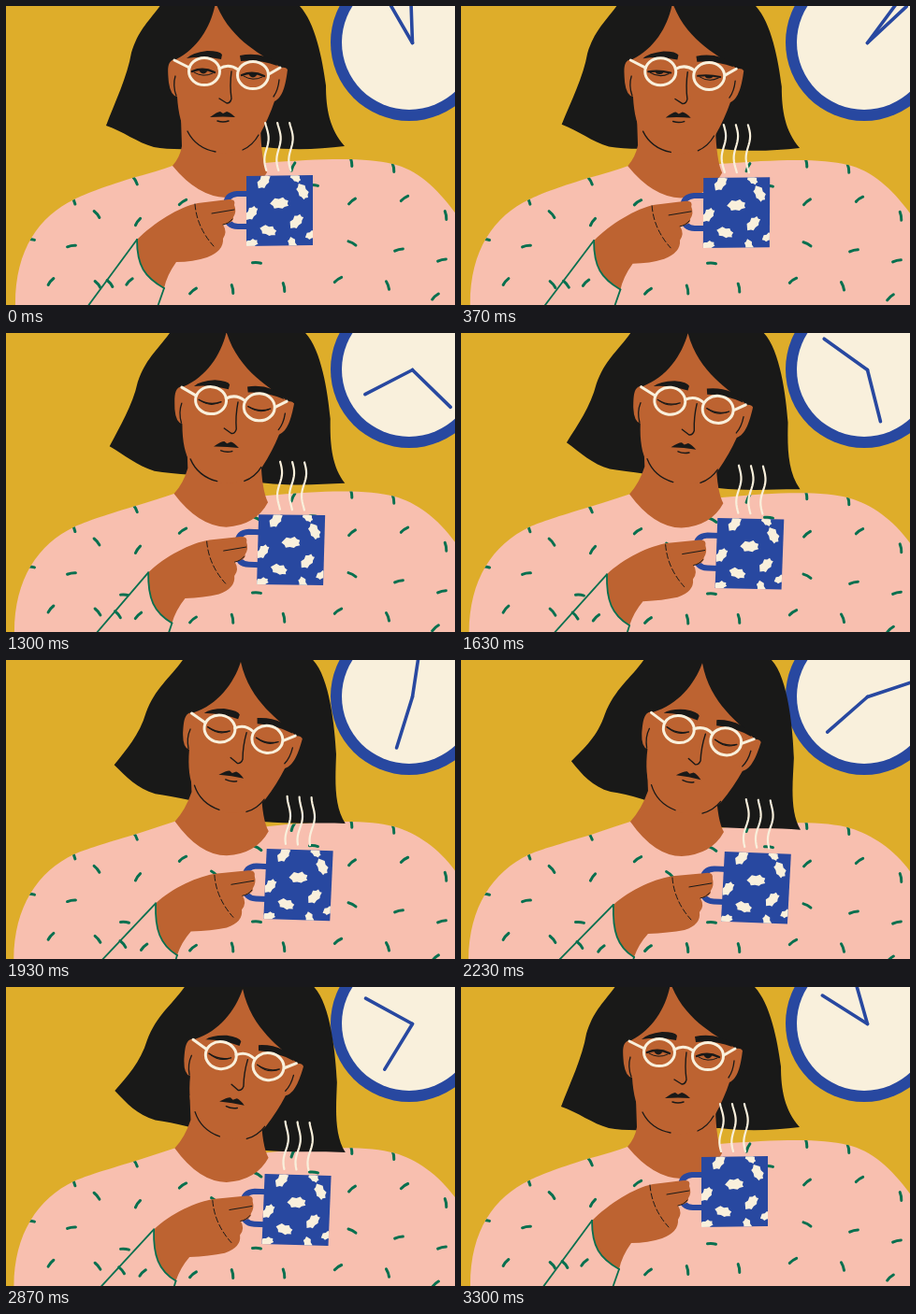
An HTML page with a canvas that plays this animation: 480 by 320 pixels, repeating every 3330 ms.

```html
<!DOCTYPE html>
<html>
<head>
<meta charset="utf-8">
<style>
html, body { margin: 0; width: 100%; height: 100%; overflow: hidden; background: #dead2a; }
canvas { display: block; }
</style>
</head>
<body>
<canvas id="stage" width="480" height="320"></canvas>
<script>
const ctx = document.getElementById('stage').getContext('2d');
const LOOP = 3330, STEP = LOOP / 100;
const GOLD = '#dead2a', BLACK = '#191918', SKIN = '#bd6331', PINK = '#f8bfaf',
      GREEN = '#07704f', BLUE = '#2848a0', CREAM = '#f9f0dc';
const rad = deg => deg * Math.PI / 180;

// Pose curves: [time, value] keys joined by a smooth spline
const LEAN = [[0, 0], [370, .06], [970, .16], [1630, .56], [2230, 1], [2870, .84], [3200, 0], [LOOP, 0]];
const LOWER = [[0, 0], [370, .09], [970, .35], [1630, .71], [2230, 1], [2870, .78], [3200, 0], [LOOP, 0]];
const EYES = [[0, 1], [370, .7], [800, 0], [2870, 0], [3200, 1], [LOOP, 1]];

function spline(keys, t) {
  let i = 0;
  while (i < keys.length - 2 && t >= keys[i + 1][0]) i++;
  const slope = j => {
    const a = keys[j - 1], b = keys[j], c = keys[j + 1];
    if (!a || !c || (b[1] - a[1]) * (c[1] - b[1]) <= 0 && c[1] === b[1]) return 0;
    return (c[1] - a[1]) / (c[0] - a[0]);
  };
  const [t0, v0] = keys[i], [t1, v1] = keys[i + 1], d = t1 - t0, u = (t - t0) / d;
  const s = u * u * (3 - 2 * u);
  return v0 + (v1 - v0) * s + d * u * (1 - u) * ((1 - u) * slope(i) - u * slope(i + 1));
}

// Blend two path strings that share the same commands
function mix(a, b, k) {
  const to = b.match(/-?[\d.]+/g);
  let i = 0;
  return a.replace(/-?[\d.]+/g, n => +n + (to[i++] - n) * k);
}
function fill(d, color) {
  ctx.fillStyle = color;
  ctx.fill(new Path2D(d));
}
function line(d, color, width) {
  ctx.strokeStyle = color;
  ctx.lineWidth = width;
  ctx.stroke(new Path2D(d));
}
function disc(x, y, r, color) {
  ctx.fillStyle = color;
  ctx.beginPath();
  ctx.arc(x, y, r, 0, 7);
  ctx.fill();
}
function group(draw, x = 0, y = 0, deg = 0, px = 0, py = 0) {
  ctx.save();
  ctx.translate(px + x, py + y);
  ctx.rotate(rad(deg));
  ctx.translate(-px, -py);
  draw();
  ctx.restore();
}
function sprinkle(x, y, deg) {
  group(() => line('M-4.5 0Q0 -1 4.5 0', GREEN, 3), x, y, deg);
}

function clock(t) {
  disc(431, 39, 84, BLUE);
  disc(431, 39, 72, CREAM);
  for (const deg of [330 + .21 * t, -2 + .105 * t])
    group(() => line('M0 0V-57', BLUE, 3.6), 434.5, 39.5, deg);
}

const SPRINKLES = [
  [138, 187, 60], [72, 208, 65], [97, 223, 50], [141, 231, -55], [26, 250, 5], [70, 257, -10],
  [48, 295, -50], [98, 298, 50], [127, 280, 5], [189, 210, -35], [223, 225, 40], [242, 303, 80],
  [200, 305, -40], [268, 275, 3], [297, 301, 80], [355, 293, -35], [370, 209, -40], [426, 206, -35],
  [370, 254, 28], [420, 261, -14], [466, 272, -14], [408, 299, 70], [459, 311, -42], [369, 167, 80],
  [414, 173, 80], [470, 224, 80], [307, 172, -65], [269, 196, 30], [329, 192, 5]
];

function body(low) {
  const shape = mix(
    'M178 171Q162 177 135 184C100 195 85 201 73 207C35 225 9 262 10 322H482V224C462 196 440 175 413 169C385 162 340 163 276 168Z',
    'M181 173Q165 178 139 187C102 198 88 202 73 208C33 227 8 266 8 322H482V229C465 204 440 187 416 180C388 172 340 173 276 180Z', low);
  group(() => {
    fill(shape, PINK);
    ctx.clip(new Path2D(shape));
    for (const [x, y, deg] of SPRINKLES)
      sprinkle(x, y + low * 9 * Math.min(1, Math.max(.1, (x - 100) / 250)), deg);
  });
}

function hair(lean) {
  fill(mix(
    'M166 -2C150 20 142 25 134 50C130 75 116 104 107 128C125 134 140 146 158 151Q175 154 200 153L276 151C310 155 335 153 362 150C346 132 342 110 342 85C338 55 330 15 312 -2Z',
    'M197 -2C182 20 165 30 154 58C146 82 132 94 118 108C130 123 140 135 160 141Q175 143 194 149L274 179C310 182 335 179 363 182C351 162 355 130 356 105C355 75 350 15 330 -2Z', lean), BLACK);
}

function neck(low) {
  fill(mix(
    'M187 120L188 150Q186 162 178 171Q205 204 235 205Q266 203 279 178Q273 165 272 130Z',
    'M199 115L200 140Q193 160 181 173Q207 210 236 210Q268 208 281 184Q274 172 273 140Z', low), SKIN);
}

function eye(x, y, open) {
  const lid = 6 - 11 * open;
  ctx.fillStyle = BLACK;
  if (open > .05) {
    ctx.beginPath();
    ctx.ellipse(x, y + lid / 2, 4.5, 5 * open, 0, 0, Math.PI);
    ctx.fill();
  }
  line(`M${x - 12} ${y}Q${x} ${y + lid} ${x + 12} ${y + 1}`, BLACK, 1.4 + open);
  line(`M${x - 10} ${y + 1}Q${x} ${y + 7} ${x + 10} ${y + 2}`, BLACK, 1);
}

function lens(x, y) {
  ctx.beginPath();
  ctx.ellipse(x, y, 16.5, 14.5, 0, 0, 7);
  ctx.strokeStyle = CREAM;
  ctx.lineWidth = 3;
  ctx.stroke();
}

function head(open) {
  fill('M224 -4C220 20 206 45 182 57C171 57 173 70 174 82Q176 96 183 97C184 115 188 130 194 137Q208 157 230 158Q258 157 271 138Q281 120 287 102C296 98 299 84 301 68Q299 65 294 66C275 52 240 38 224 -4Z', SKIN);
  line('M181 75Q178 85 182 96M292 79Q291 90 286 97M194 134Q203 152 224 156M253 154Q264 149 270 138', BLACK, 1.3);
  line('M241 70Q239 85 241 99Q240 104 236 104L228 99', BLACK, 1.4);
  fill('M193 56Q199 50 215 48Q229 48 231 52L230 57Q211 53 193 56ZM250 53Q264 50 277 54Q288 58 290 64Q270 57 251 59Z', BLACK);
  fill('M218 119Q226 113 229 113L232 115L236 113Q240 114 245 119Q232 118 218 119Z', BLACK);
  line('M226 123Q232 125 238 123', BLACK, 1.5);
  eye(211, 70, open);
  eye(264, 74, open);
  lens(212, 70);
  lens(264, 74);
  line('M180 58L196 66M281 73L293 66M228 67Q238 61 248 68', CREAM, 3);
}

// x, y, angle, size
const PATCHES = [
  [275, 188, -55, 1], [309, 183, 40, .75], [317, 198, 62, 1], [292, 211, -3, 1.1], [262, 222, -55, .95],
  [280, 240, 15, 1], [310, 231, -50, 1], [326, 245, -25, .75], [262, 254, -15, .8], [306, 254, 75, .8]
];

function mug(t) {
  line('M260 201H247Q235 202 235 214V223Q236 236 248 236H260', BLUE, 6);
  const cup = 'M257 182L328 181L328 256L257 257Z';
  group(() => {
    fill(cup, BLUE);
    ctx.clip(new Path2D(cup));
    for (const [x, y, deg, size] of PATCHES)
      group(() => {
        ctx.scale(size, size);
        fill('M-9 0L-6 -3L-4 -5L0 -4L4 -5.5L6 -3L9 -2L8 1L9 3L5 4L3 5.5L-1 4.5L-5 5L-6 2.5Z', CREAM);
      }, x, y, deg);
  });
  const phase = .7 * Math.sin(t / LOOP * 6 * Math.PI);
  for (const x of [278.5, 291.5, 304.5]) {
    let d = '';
    for (let y = 125; y <= 178; y += 3)
      d += `${d ? 'L' : 'M'}${x + 2.2 * Math.sin((y - 130) * .135 + phase)} ${y}`;
    line(d, CREAM, 2.2);
  }
}

function arm(low) {
  const cuff = mix('M140 250C140 278 148 290 169 302', 'M163 262C162 290 167 307 185 318', low);
  fill(cuff + mix('L162 322H86L140 250', 'L183 322H104L163 262', low), PINK);
  sprinkle(111 + 16 * low, 297 + 8 * low, 50);
  sprinkle(132 + 18 * low, 295 + 14 * low, -45);
  fill(mix(
    'M140 250C158 232 185 215 205 211L238 207Q246 206 244 213Q247 220 243 226Q244 232 232 234Q237 242 232 249Q233 262 215 269Q200 274 182 274Q172 288 169 302C148 290 140 278 140 250Z',
    'M163 262C180 246 209 233 229 231L262 228Q270 227 269 234Q271 241 267 247Q268 253 256 255Q261 263 255 270Q257 283 239 289Q222 292 200 293Q190 304 185 318C167 307 162 290 163 262Z', low), SKIN);
  line(cuff, GREEN, 1.8);
  line(mix('M140 250L87 322M169 302L162 322', 'M163 262L104 322M185 318L184 322', low), GREEN, 1.8);
  group(() => {
    line('M220 222L244 218M232 234Q238 233 242 228', BLACK, 1);
    ctx.setLineDash([6, 3]);
    line('M202 212Q204 237 222 257', BLACK, 1);
  }, 24 * low, 21 * low);
}

function frame(now) {
  const t = Math.floor(now % LOOP / STEP) * STEP;
  const lean = spline(LEAN, t), low = spline(LOWER, t), open = Math.max(0, spline(EYES, t));
  ctx.lineCap = ctx.lineJoin = 'round';
  ctx.fillStyle = GOLD;
  ctx.fillRect(0, 0, 480, 320);
  clock(t);
  body(low);
  hair(lean);
  neck(low);
  group(() => head(open), 21 * lean, 4 * low, 10.5 * lean, 212, 70);
  group(() => mug(t), 25 * low, 23 * low, 3 * low, 257, 181);
  arm(low);
}

let start;
function tick(now) {
  start ??= now;
  frame(now - start);
  requestAnimationFrame(tick);
}
frame(0);
requestAnimationFrame(tick);
</script>
</body>
</html>
```
